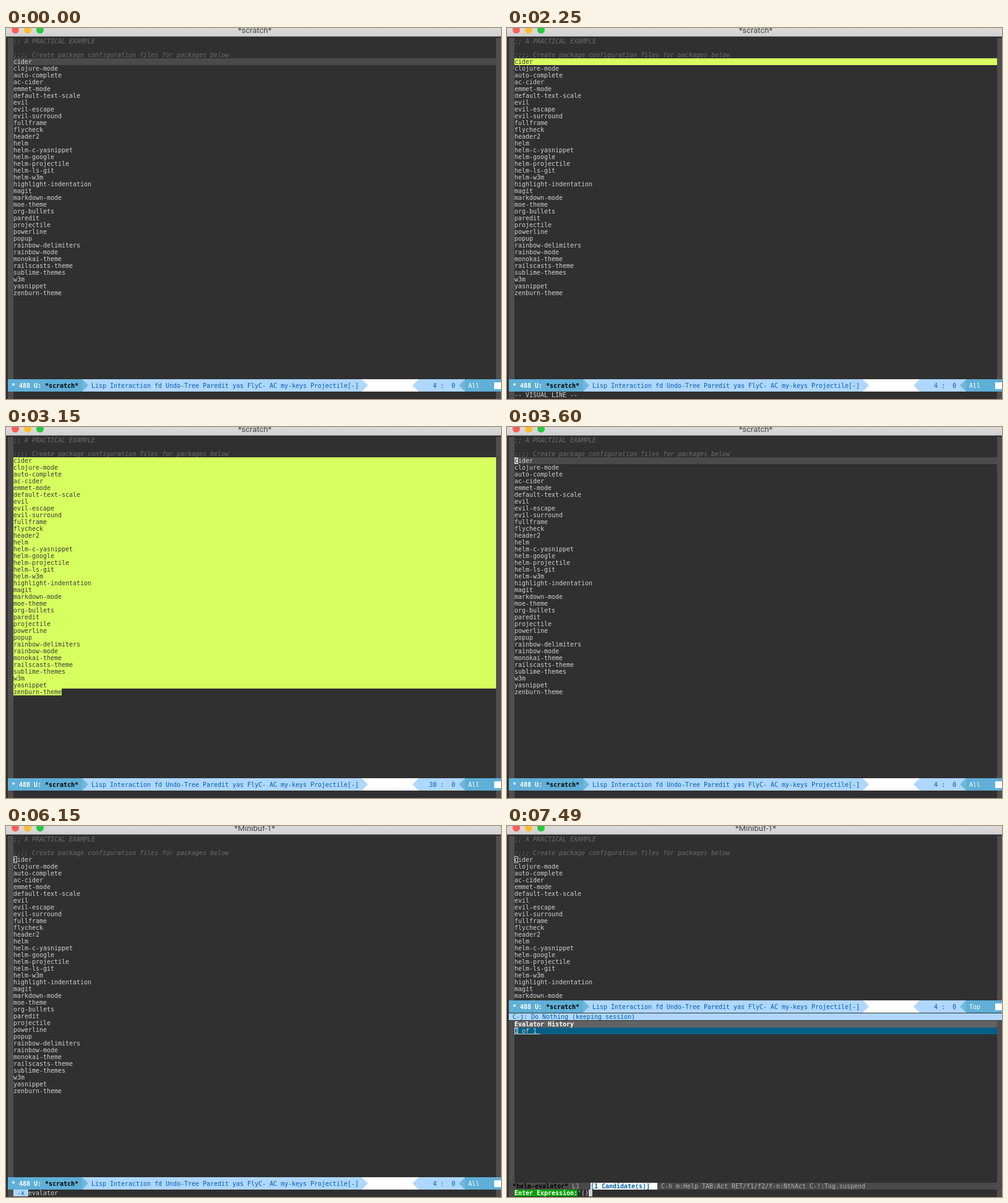
An HTML page with a canvas for the animation above (8000 ms loop, 800 by 600 pixels).

```html
<!DOCTYPE html>
<html lang="en">
<head>
<meta charset="utf-8">
<title>Editor session</title>
<style>
  html, body { margin: 0; width: 100%; height: 100%; overflow: hidden; background: #303030; }
  canvas { display: block; }
</style>
</head>
<body>
<canvas id="stage" width="800" height="600"></canvas>
<script>
const ctx = document.getElementById('stage').getContext('2d');
const LOOP = 8000, CELL = 6, ROW = 11, LEFT = 12, RIGHT = 792, TOP = 16;
const MONO = '"DejaVu Sans Mono", monospace';
const C = {
  bg: '#303030', fringe: '#4e4e4e', line: '#4a4a4a', text: '#d0d0d0', comment: '#6c6c6c',
  region: '#d7ff5f', dark: '#3a3a3a', blue: '#5fafd7', tip: '#6fb8dc', pale: '#afd7ff',
  ink: '#005faf', row: '#005f87', head: '#626262', green: '#00a000', white: '#ffffff'
};

const comments = [';; A PRACTICAL EXAMPLE', '', ';;;; Create package configuration files for packages below'];
const packages = `cider clojure-mode auto-complete ac-cider emmet-mode default-text-scale evil
  evil-escape evil-surround fullframe flycheck header2 helm helm-c-yasnippet helm-google
  helm-projectile helm-ls-git helm-w3m highlight-indentation magit markdown-mode moe-theme
  org-bullets paredit projectile powerline popup rainbow-delimiters rainbow-mode monokai-theme
  railscasts-theme sublime-themes w3m yasnippet zenburn-theme`.split(/\s+/);
const modes = 'Lisp Interaction fd Undo-Tree Paredit yas FlyC- AC my-keys Projectile[-]';

// Scene changes, cursor blinks and typed text, all in ms.
const scenes = [[0, 'normal'], [1650, 'visual'], [2700, 'region'], [3600, 'normal'], [4350, 'command'], [6300, 'helm']];
const blinks = [[0, false], [300, true], [900, false], [1350, true], [2250, false], [2700, true],
  [3150, false], [3600, true], [4050, false], [4350, true], [6150, false], [6300, true],
  [6750, false], [6900, true]];
const typed = [[0, ''], [4800, 'e'], [4950, 'eva'], [5100, 'eval'], [5250, 'evala'], [5400, 'evalato'],
  [5700, 'evalator'], [6300, ''], [6900, "'"], [7350, "'("], [7490, "'()"]];

function at(track, t) {
  let value = track[0][1];
  for (const [start, v] of track) if (t >= start) value = v;
  return value;
}

function box(x, y, w, h, color) {
  ctx.fillStyle = color;
  ctx.fillRect(x, y, w, h);
}

function poly(color, ...pts) {
  ctx.fillStyle = color;
  ctx.beginPath();
  for (const [x, y] of pts) ctx.lineTo(x, y);
  ctx.fill();
}

function text(str, x, base, color, style = '') {
  ctx.font = `${style} 10px ${MONO}`;
  ctx.letterSpacing = '0px';
  ctx.letterSpacing = (CELL - ctx.measureText('M').width) + 'px';
  ctx.textAlign = 'left';
  ctx.fillStyle = color;
  ctx.fillText(str, x, base);
}

const rowY = i => TOP + i * ROW;

function hollow(x, y) {
  ctx.strokeStyle = C.text;
  ctx.lineWidth = 1;
  ctx.strokeRect(x + 0.5, y + 0.5, CELL - 1, ROW - 1);
}

function titleBar(title) {
  const g = ctx.createLinearGradient(0, 0, 0, 13);
  g.addColorStop(0, '#dadada');
  g.addColorStop(1, '#d2d2d2');
  box(0, 0, 800, 13, g);
  box(0, 13, 800, 1, '#a4a4a4');
  ['#ff5f57', '#ffbd2e', '#28c940'].forEach((color, i) => {
    ctx.fillStyle = color;
    ctx.beginPath();
    ctx.arc(15 + i * 20, 3, 6, 0, Math.PI * 2);
    ctx.fill();
  });
  ctx.font = '13px Roboto, sans-serif';
  ctx.letterSpacing = '0px';
  ctx.textAlign = 'center';
  ctx.fillStyle = '#444444';
  ctx.fillText(title, 402, 8);
}

function modeLine(y, line, where) {
  const mid = y + 10, end = y + 20, base = y + 14;
  box(3, y, 797, 20, C.white);
  box(123, y, 452, 20, C.pale);
  poly(C.pale, [575, y], [585, mid], [575, end]);
  box(3, y, 120, 20, C.blue);
  poly(C.tip, [123, y], [133, mid], [123, end]);
  box(667, y, 75, 20, C.pale);
  poly(C.pale, [667, y], [657, mid], [667, end]);
  box(742, y, 58, 20, C.blue);
  poly(C.tip, [742, y], [732, mid], [742, end]);
  box(789, y + 5, 11, 11, C.white);
  text('* 488 U:', 9, base, C.white, 'bold');
  text('*scratch*', 63, base, '#000000', 'bold');
  text(modes, 138, base, C.ink);
  text(String(line).padStart(2) + ' :  0', 684, base, C.ink);
  text(where, 747, base, C.white);
}

function buffer(scene, blink) {
  const count = packages.length, last = count - 1;
  const width = RIGHT - LEFT;
  if (scene === 'normal') box(LEFT, rowY(3), width, ROW, C.line);
  if (scene === 'visual') box(LEFT, rowY(3), width, ROW, C.region);
  if (scene === 'region') {
    box(LEFT, rowY(3), width, last * ROW, C.region);
    box(LEFT, rowY(3 + last), packages[last].length * CELL, ROW, C.region);
  }
  comments.forEach((s, i) => text(s, LEFT, rowY(i) + 9, C.comment, 'italic'));
  packages.forEach((s, i) => {
    const lit = scene === 'region' || (scene === 'visual' && i === 0);
    text(s, LEFT, rowY(i + 3) + 9, lit ? C.dark : C.text);
  });
  if (scene === 'command' || scene === 'helm') {
    hollow(LEFT, rowY(3));
  } else if (blink) {
    const i = scene === 'region' ? last : 0;
    box(LEFT, rowY(i + 3), CELL, ROW, C.text);
    text(packages[i][0], LEFT, rowY(i + 3) + 9, C.bg);
  }
}

function helmWindow() {
  box(0, 302, 800, 286, C.bg);
  box(3, 315, 9, 262, C.fringe);
  box(RIGHT, 315, 8, 262, C.fringe);
  box(3, 303, 797, 11, C.pale);
  text('C-j: Do Nothing (keeping session)', 9, 312, C.ink);
  box(LEFT, 315, RIGHT - LEFT, ROW, C.head);
  text('Evalator History', LEFT, 324, C.white, 'bold');
  box(LEFT, 326, RIGHT - LEFT, ROW, C.row);
  text('1 of 1', LEFT, 335, C.text);
  box(LEFT, 336, 42, 1, C.text);
  hollow(LEFT, 326);
  box(3, 577, 797, ROW, C.line);
  text('*helm-evalator*', 9, 586, '#000000', 'bold');
  text('L1', 105, 586, '#a8a8a8');
  box(135, 577, 108, ROW, C.white);
  text('[1 Candidate(s)]', 135, 586, C.ink, 'bold');
  text('C-h m:Help TAB:Act RET/f1/f2/f-n:NthAct C-!:Tog.suspend', 249, 586, '#b2b2b2');
}

function minibuffer(scene, blink, input, t) {
  const y = 588, base = 597;
  if (scene === 'visual') text('-- VISUAL LINE --', LEFT, base, C.text);
  if (scene !== 'command' && scene !== 'helm') return;
  let x;
  if (scene === 'command') {
    x = 36;
    box(LEFT, y, 24, ROW, C.pale);
    text(t < 6150 ? 'M-x' : ' -x', LEFT, base, C.ink);
  } else {
    x = 114;
    box(LEFT, y, 102, ROW, C.green);
    text('Enter Expression:', LEFT, base, C.white, 'bold');
  }
  text(input, x, base, C.text);
  if (blink) box(x + input.length * CELL, y, CELL, ROW, C.text);
}

function draw(t) {
  const scene = at(scenes, t), blink = at(blinks, t);
  const helm = scene === 'helm';
  box(0, 0, 800, 600, C.bg);
  box(3, TOP, 9, 584, C.fringe);
  box(RIGHT, TOP, 8, 584, C.fringe);
  buffer(scene, blink);
  if (helm) helmWindow();
  modeLine(helm ? 282 : 568, scene === 'region' ? 38 : 4, helm ? 'Top' : 'All');
  minibuffer(scene, blink, at(typed, t), t);
  titleBar(helm || scene === 'command' ? '*Minibuf-1*' : '*scratch*');
}

const start = performance.now();
function tick() {
  draw((performance.now() - start) % LOOP);
  requestAnimationFrame(tick);
}
tick();
</script>
</body>
</html>
```
